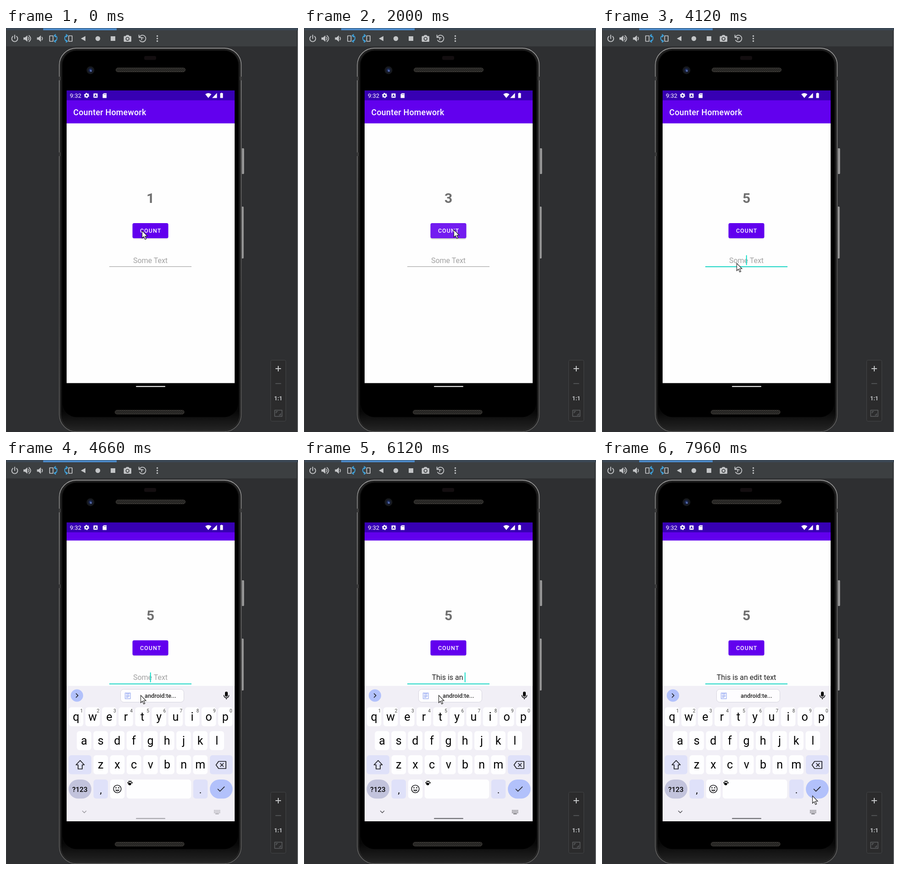
An HTML page that plays this animation: 636x880 px, repeating every 8000 ms.

```html
<!DOCTYPE html>
<html lang="en">
<head>
<meta charset="utf-8">
<title>Counter Homework</title>
<style>
html, body { margin: 0; width: 100%; height: 100%; overflow: hidden; background: #2e2f31; }
svg { display: block; }
text { font-family: Roboto, "Noto Sans", sans-serif; white-space: pre; }
.mid { text-anchor: middle; }
.line { fill: none; stroke-linecap: round; stroke-linejoin: round; }
</style>
</head>
<body>
<svg width="636" height="880" viewBox="0 0 636 880">
  <defs>
    <linearGradient id="key" x1="0" x2="1" y1="0" y2="0">
      <stop offset="0" stop-color="#3c3c3c"/><stop offset=".6" stop-color="#b4b4b4"/><stop offset="1" stop-color="#5c5c5c"/>
    </linearGradient>
    <linearGradient id="edge" x1="0" x2="0" y1="0" y2="1">
      <stop offset="0" stop-color="#9a9a9a"/><stop offset=".05" stop-color="#868686"/>
      <stop offset=".3" stop-color="#6c6c6c"/><stop offset=".7" stop-color="#4c4c4c"/><stop offset="1" stop-color="#5c5c5c"/>
    </linearGradient>
    <linearGradient id="lip" x1="0" x2="0" y1="0" y2="1">
      <stop offset="0" stop-color="#141414"/><stop offset=".95" stop-color="#070707"/><stop offset="1" stop-color="#242424"/>
    </linearGradient>
    <radialGradient id="lens">
      <stop offset="0" stop-color="#4560a8"/><stop offset=".45" stop-color="#1c2850"/><stop offset="1" stop-color="#14161c"/>
    </radialGradient>
    <pattern id="mesh" width="4" height="4" patternUnits="userSpaceOnUse">
      <rect width="4" height="4" fill="#161616"/>
      <path d="M0 0L4 4M4 0L0 4" stroke="#403d39" stroke-width=".9"/>
    </pattern>
    <clipPath id="screen"><rect x="132" y="157" width="366" height="630"/></clipPath>
    <filter id="soft" x="-20%" y="-40%" width="140%" height="200%"><feGaussianBlur stdDeviation="1.3"/></filter>
  </defs>

  <!-- emulator window -->
  <rect width="636" height="880" fill="#2e2f31"/>
  <rect width="636" height="5" fill="#3b4754"/>
  <rect x="81" y=".7" width="160" height="4.300" fill="#4a88c7"/>
  <rect y="5" width="633" height="35" fill="#3c3f41"/>
  <rect width="1" height="880" fill="#3a3c3e"/>
  <rect x="633" y="5" width="1.500" height="875" fill="#26282a"/>
  <rect x="634.500" y="5" width="1.500" height="875" fill="#75787a"/>

  <g fill="#c3c5c7" stroke="#c3c5c7" stroke-width="0">
    <path class="line" stroke-width="1.9" d="M15 18.2a6.4 6.4 0 1 0 8 0M19 15.5v7.5"/>
    <path d="M38 20.5h3.5l5-4.5v14l-5-4.5h-3.5z"/>
    <path class="line" stroke-width="1.7" d="M48.7 20q2.4 3 0 6M50 16.3q7.5 6.7 0 13.4"/>
    <path d="M67.5 20.5h3.5l5-4.5v14l-5-4.5h-3.5z"/>
    <path class="line" stroke-width="1.7" d="M78.2 20q2.4 3 0 6"/>
    <rect class="line" stroke-width="1.7" x="95" y="17" width="7.5" height="12" rx=".5"/>
    <rect class="line" stroke-width="1.7" x="136.500" y="17" width="7.5" height="12" rx=".5"/>
    <g id="turn" class="line" stroke="#3fa0d8" stroke-width="1.9"><path d="M105 16.5q7 .5 6 6.5t-5.500 6M108 14l-3 2.500 3 3M108 26.500l-3 2.500 3 2"/></g>
    <use href="#turn" transform="matrix(-1 0 0 1 239 0)"/>
    <path d="M163 23l10-5.500v11z"/><circle cx="200" cy="23" r="5.200"/><rect x="228" y="18" width="10" height="10"/>
    <path fill-rule="evenodd" d="M258 17.500h2.700l1.600-2.200h4.800l1.600 2.200h2.700q1.500 0 1.500 1.500v9.500q0 1.500-1.500 1.500h-13.400q-1.500 0-1.500-1.500v-9.500q0-1.500 1.500-1.500zM264.700 19.400a4.200 4.200 0 1 0 .01 0z"/>
    <circle cx="264.700" cy="23.600" r="2.500"/>
    <path class="line" stroke-width="1.800" d="M290.500 20a7.300 7.300 0 1 1 .5 6.800M289.500 15.500v5h5M295.500 21.200v4.500M295.500 22q1.500-1.500 3.500-.5"/>
    <circle cx="329.500" cy="17.500" r="1.700"/><circle cx="329.500" cy="23" r="1.700"/><circle cx="329.500" cy="28.500" r="1.700"/>
  </g>

  <rect x="576.500" y="723.500" width="33" height="133" rx="3" fill="#2b2b2c" stroke="#434547"/>
  <g class="line" stroke="#c3c5c7" stroke-width="2">
    <path stroke-linecap="butt" d="M587 742h12M593 736v12"/>
    <path stroke="#5d5f61" stroke-width="1.700" d="M587.500 774.500h11"/>
    <path stroke="#5d5f61" stroke-width="1.500" d="M585.200 832.500h16v13.500h-16zM588.500 838.500v-3h3M598 840v3h-3"/>
  </g>
  <text class="mid" x="593" y="810.700" font-size="12.500" font-weight="700" fill="#c3c5c7">1:1</text>

  <!-- phone -->
  <rect x="512" y="262" width="7" height="56" rx="2" fill="url(#key)"/>
  <rect x="512" y="389" width="6" height="113" rx="2" fill="url(#key)"/>
  <rect x="115" y="42.500" width="398.500" height="838" rx="38" fill="#2c2c2c"/>
  <rect x="116.200" y="43.800" width="396.100" height="835.400" rx="37" fill="#1d1d1d" stroke="url(#edge)" stroke-width="1.800"/>
  <rect x="119.500" y="47" width="389.500" height="829.500" rx="34" fill="url(#lip)" stroke="#2e2e2e"/>
  <rect x="123" y="49.500" width="383" height="798" rx="31" fill="#000"/>
  <path d="M115 106h4v8h-4zM509.500 106h4v8h-4zM115 271h4v8h-4z" fill="#3a3a3a"/>
  <rect x="301" y="61" width="26" height="8.500" rx="3" fill="#130e10"/>
  <circle cx="184" cy="92" r="8.500" fill="#17191d"/><circle cx="184" cy="92" r="6" fill="url(#lens)"/>
  <circle cx="185" cy="93.500" r="1.500" fill="#7288cc"/>
  <rect x="239.500" y="87" width="151" height="8.500" rx="4.200" fill="url(#mesh)" stroke="#45423e"/>
  <rect x="237.500" y="832.500" width="150.500" height="8.500" rx="4.200" fill="url(#mesh)" stroke="#45423e"/>

  <!-- app -->
  <rect x="132" y="157" width="366" height="616.500" fill="#fefefe"/>
  <rect x="283" y="779.700" width="64" height="2.300" rx="1.100" fill="#e4e4e4"/>
  <g clip-path="url(#screen)">
    <g id="app">
      <rect x="132" y="137" width="366" height="70.700" fill="#6200ee"/>
      <text x="146.500" y="189.500" font-size="17.780" font-weight="500" letter-spacing=".300" fill="#fff">Counter Homework</text>
      <text id="count" class="mid" x="314.500" y="381" font-size="30" font-weight="700" fill="#6f6f6f"></text>
      <rect id="shade" x="276" y="427" width="77" height="33" rx="4" fill="#000" filter="url(#soft)"/>
      <rect x="275.500" y="425" width="78" height="33" rx="3.500" fill="#6200ee"/>
      <g id="ripple" fill="#fff">
        <rect x="275.500" y="425" width="78" height="33" rx="3.500" opacity=".8"/>
        <rect x="281" y="425" width="67" height="33" rx="8" opacity=".2"/>
      </g>
      <text class="mid" x="315.200" y="446.200" font-size="12.440" font-weight="500" letter-spacing="1.110" fill="#fff">COUNT</text>
      <text id="field" class="mid" x="314.500" y="511.800" font-size="16"></text>
      <rect id="rule" x="225" width="179"/>
      <rect id="caret" y="495" width="1.800" height="21.500" fill="#03dac5"/>
    </g>
    <g id="board"></g>
  </g>

  <!-- status bar -->
  <rect x="132" y="136" width="366" height="21.500" fill="#3700b3"/>
  <g fill="#fff">
    <text x="139" y="152" font-size="13">9:32</text>
    <circle cx="175.500" cy="147" r="3.300" fill="none" stroke="#fff" stroke-width="2.600"/>
    <circle cx="175.500" cy="147" r="4.800" fill="none" stroke="#fff" stroke-width="1.700" stroke-dasharray="2.500 2.527"/>
    <rect x="190.500" y="142.500" width="9" height="9.500" rx="1"/>
    <path class="line" stroke="#3700b3" stroke-width="1.200" d="M193 149.700l2-4.700 2 4.700M193.800 148.300h2.500"/>
    <path d="M213 142h6v10.500h-8.500v-8z"/><path d="M213.500 143.500v2M215.500 143.500v2M217.300 143.500v2" stroke="#3700b3" stroke-width=".8"/>
    <path d="M434 144.200q6.700-5 13.400 0l-6.700 8.300zM449 152.500h10.500v-11zM467.500 142h1v-1h2v1h2v10.500h-6v-10.500z"/>
  </g>

  <path id="mouse" d="M.5.5V16.700L4.200 13.300 6.900 19.600 9.500 18.500 6.800 12.300H11.900Z" fill="#fff" stroke="#1a1a1a" stroke-width="1.100"/>
</svg>
<script>
const $ = id => document.getElementById(id);
const LOOP = 8000, PHRASE = "This is an edit text", PITCH = 36.15;

const key = (x, y, w, fill = "#fefeff", r = 6) =>
  `<rect x="${x}" y="${y}" width="${w}" height="41.5" rx="${r}" fill="${fill}"/>`;
const label = (s, x, y, size, more = "") =>
  `<text class="mid" x="${x}" y="${y}" font-size="${size}" ${more}>${s}</text>`;
const stroke = (d, color = "#1b1b1f", w = 1.7) =>
  `<path class="line" d="${d}" stroke="${color}" stroke-width="${w}"/>`;
const row = (letters, cx, y, digits) => [...letters].map((c, i) => {
  const x = cx + i * PITCH;
  return key(x - 15.8, y, 31.6) + label(c, x, y + 29, 25, 'data-key="1"') +
    (digits ? label((i + 1) % 10, x + 12, y + 11, 10, 'fill="#444"') : "");
}).join("");

function keyboard() {
  const tint = "#dfe1f9", blue = "#b2c1fb";
  let dots = "";
  for (let i = 0; i < 15; i++)
    dots += `<rect x="${453 + i % 5 * 2.9}" y="${762.5 + (i / 5 | 0) * 2.6}" width="1.7" height="1.5"/>`;
  return `<rect x="132" y="492" width="366" height="300" fill="#f1eff6"/>
    <circle cx="154.5" cy="513" r="13.5" fill="${blue}"/>` + stroke("M152.8 509l4 4-4 4") +
    `<rect x="249.5" y="499.5" width="138" height="28" rx="7" fill="#fefdff" stroke="#d6d5df"/>` +
    stroke("M259.5 507.5h11.5v12.5h-11.5zM262.5 507.5h5.5v2h-5.5zM262 512.5h6.5M262 514.7h6.5M262 517h4", "#a3b4f3", 1.4) +
    `<text x="302" y="518" font-size="12.8" font-weight="500" fill="#222">android:te...</text>
    <rect x="477" y="504.5" width="6" height="11" rx="3"/>` +
    stroke("M474.5 512.5a5.5 5.5 0 0 0 11 0M480 518v3", "#1b1b1f", 1.6) +
    row("qwertyuiop", 152.5, 538.5, true) + row("asdfghjkl", 170, 590.5) + row("zxcvbnm", 206.3, 643) +
    key(136.5, 643, 49.5, tint) + key(444, 643, 49.5, tint) +
    stroke("M161.5 654.5l-9 9.5h4.5v9h9v-9h4.5z") +
    stroke("M463 656.5h16v15.5h-16l-5.5-7.75zM467 661l6.5 6.5M473.5 661l-6.5 6.5") +
    key(136.5, 696, 49.5, "#c2c3dc", 20.7) + label("?123", 161, 722.5, 15.2, 'font-weight="500"') +
    key(190.5, 696, 31.5, tint) + label(",", 206.5, 726, 21) +
    key(226.8, 696, 31.5) + `<circle class="line" cx="242.5" cy="716.5" r="8.3" stroke="#1b1b1f" stroke-width="1.6"/>
    <circle cx="239.5" cy="714" r="1.3"/><circle cx="245.5" cy="714" r="1.3"/>` +
    stroke("M238.5 718.8q4 4.5 8 0z", "#1b1b1f", 1.3) +
    key(262.8, 696, 140.5) +
    `<g><ellipse cx="269.5" cy="705.8" rx="3.2" ry="2.7"/><circle cx="265.8" cy="703" r="1.5"/>
      <circle cx="268.3" cy="700" r="1.6"/><circle cx="271.8" cy="700" r="1.6"/><circle cx="274.2" cy="703" r="1.6"/></g>` +
    key(407.8, 696, 31.5, tint) + label(".", 423.5, 726, 21) +
    key(444, 696, 49.5, blue, 20.7) + stroke("M461.5 717l4.5 4.5 9.5-9.5") +
    `<g id="nav">` + stroke("M166.5 764.5l4 4 4-4", "#55555a", 1.5) +
    `<g fill="#55555a">${dots}<rect x="456" y="770" width="7.5" height="1.5"/></g>
    <rect x="283" y="779.7" width="64" height="2.3" rx="1.1" fill="#717176"/></g>`;
}
$("board").innerHTML = keyboard();
const caps = [...document.querySelectorAll("[data-key]")].map(el => ({ el, low: el.textContent }));

// Each track is a list of [start ms, value...], held until the next entry.
const track = {
  count: [[0, 1], [140, 2], [1520, 3], [2850, 4], [3250, 5]],
  ripple: [[0, 0], [140, .23], [290, .1], [550, .04], [670, 0], [1520, .1], [1640, .23], [2000, .13], [2120, .06],
    [2240, 0], [2850, .12], [2980, .23], [3520, .13], [3640, .06], [3760, 0]],
  mouse: [[0, 296, 441], [550, 299, 441], [670, 304, 441], [790, 313, 440], [910, 323, 440], [1030, 328, 440],
    [1150, 327, 440], [1270, 326, 439], [2480, 317, 439], [2600, 310, 439], [3250, 309, 470], [3370, 302, 529],
    [3520, 298, 526], [3640, 294, 521], [3760, 293, 518], [4000, 293, 512], [7480, 325, 538], [7600, 390, 600],
    [7720, 452, 675], [7840, 486, 722], [7960, 458, 731]],
  focus: [[0, 0], [4000, 1]],
  caret: [[0, 0], [4120, 1], [7720, 0]],
  pan: [[0, 0, 0], [4520, -16, 130], [4660, -32.3, 0]],
  board: [[0, 0], [4520, 1]],
  caps: [[0, 0], [4820, 1], [5080, 0]],
  nav: [[0, .55], [5620, .7], [5740, .85], [5860, 1]],
  typed: [[0, 0], [4820, 1], [4940, 2], [5080, 3], [5210, 4], [5350, 5], [5500, 6], [5620, 7], [5740, 8], [5860, 9],
    [6000, 10], [6120, 11], [6240, 12], [6480, 14], [6600, 15], [6730, 16], [6850, 17], [6970, 18], [7090, 19], [7230, 20]]
};
const at = (name, t) => track[name].findLast(step => step[0] <= t).slice(1);

function set(id, attrs) {
  for (const k in attrs) $(id).setAttribute(k, attrs[k]);
}

function draw(t) {
  const [ripple] = at("ripple", t), [typed] = at("typed", t), [focus] = at("focus", t);
  const [pan, slide] = at("pan", t), [upper] = at("caps", t);
  $("count").textContent = at("count", t)[0];
  set("ripple", { opacity: ripple });
  set("shade", { opacity: .08 + ripple });
  $("field").textContent = typed ? PHRASE.slice(0, typed) : "Some Text";
  set("field", { fill: typed ? "#212121" : "#a3a3a3" });
  set("rule", focus ? { y: 519, height: 2, fill: "#1fd6c6" } : { y: 519, height: 1.3, fill: "#a8a8a8" });
  const half = typed ? $("field").getComputedTextLength() / 2 : 0;
  set("caret", { x: 313.8 + half, opacity: at("caret", t)[0] });
  set("app", { transform: `translate(0 ${pan})` });
  set("board", { transform: `translate(0 ${slide})`, visibility: at("board", t)[0] ? "visible" : "hidden" });
  set("nav", { opacity: at("nav", t)[0] });
  for (const { el, low } of caps) el.textContent = upper ? low.toUpperCase() : low;
  set("mouse", { transform: `translate(${at("mouse", t).join(" ")})` });
}

const start = performance.now();
function tick() {
  draw((performance.now() - start) % LOOP);
  requestAnimationFrame(tick);
}
tick();
</script>
</body>
</html>
```
